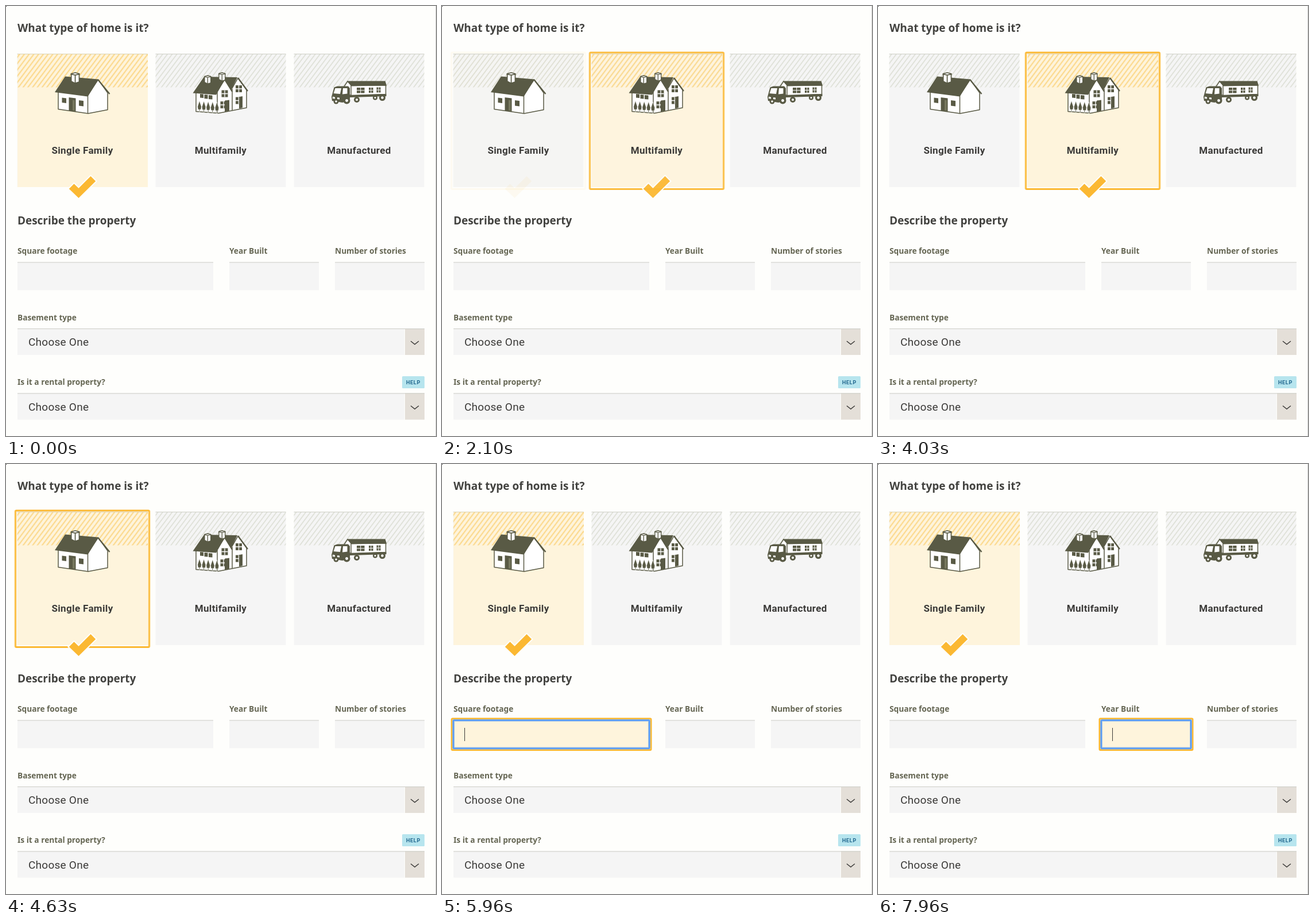
An HTML page for the animation above (8 s loop, 749x748 px).

```html
<!DOCTYPE html>
<html lang="en">
<head>
<meta charset="utf-8">
<title>Home form</title>
<style>
  html, body { margin: 0; width: 100%; height: 100%; overflow: hidden; background: #fefefc; }
  svg { display: block; width: 749px; height: 748px; }
  text { font-family: "Noto Sans", "Open Sans", sans-serif; font-weight: 600; }
  .heading { font-size: 18.95px; fill: #42423f; }
  .label { font-size: 13.7px; fill: #656653; }
  .name { font: 700 17px Roboto, sans-serif; letter-spacing: .35px; text-anchor: middle; fill: #3b3a38; }
  .value { font: 400 19px Roboto, sans-serif; letter-spacing: .25px; fill: #3b3a38; }
  .help { font: 700 9.2px Roboto, sans-serif; letter-spacing: .6px; fill: #22688f; }
  .ink { fill: #595a45; }
  .wall { fill: #fff; stroke: #595a45; stroke-width: 1.5; stroke-linejoin: round; }
  .line { fill: none; stroke: #595a45; stroke-width: 1.5; }
  .eave { fill: none; stroke: #595a45; stroke-width: 2.2; }
  .ring { fill: none; stroke: #fbb832; stroke-width: 3; }
  .fade { opacity: 0; }
</style>
</head>
<body>
<svg viewBox="0 0 749 748">
  <defs>
    <pattern id="hatchGrey" width="6.6" height="6.6" patternUnits="userSpaceOnUse" patternTransform="rotate(37)">
      <rect width="1.8" height="6.6" fill="#dfe1d8"/>
    </pattern>
    <pattern id="hatchGold" width="6.6" height="6.6" patternUnits="userSpaceOnUse" patternTransform="rotate(37)">
      <rect width="2" height="6.6" fill="#fbd685"/>
    </pattern>
    <path id="check" d="M109.800 318L118.500 309.300 126.500 317 147.500 296 156.200 304.700 126.500 334Z"
      fill="#fbb832" stroke="#fefefc" stroke-width="4" paint-order="stroke"/>
    <path id="tree" class="ink" d="M0 0L3.300 10 2.600 15H.700V20H-.700V15H-2.600L-3.300 10Z"/>
    <g id="panes">
      <rect class="ink" width="11" height="12"/>
      <path d="M5.500 0V12M0 6H11" stroke="#fff" stroke-width="1.300"/>
    </g>
    <g id="chimney">
      <path class="wall" d="M1 1.500L7 0 13 1.500V14L7 16 1 13Z"/>
      <path class="line" d="M0 2L7 3.500 14 2M7 3V16"/>
    </g>
  </defs>

  <rect width="749" height="748" fill="#fefefc"/>
  <rect x="748" width="1" height="748" fill="#d9d9d7"/>
  <rect id="corner" class="fade" width="1" height="1"/>
  <text class="heading" x="20" y="44.500">What type of home is it?</text>
  <text class="heading" x="20" y="379.500">Describe the property</text>
  <g id="cards"></g>

  <g id="house">
    <path class="wall" d="M91 149V179.500L143 187 177 180.500V151L160.500 128 142 156Z"/>
    <path class="line" d="M142.500 155V187"/>
    <path class="ink" d="M85 150L103 122.500 161 127.500 142.500 157.500Z"/>
    <path class="eave" d="M160.500 128.500L180.500 153"/>
    <use href="#chimney" transform="translate(112.500 116) scale(1.150)"/>
    <path class="ink" d="M97.500 159.500L105 160.500V169L97.500 168ZM109.500 159L121.500 160.500V184L109.500 182ZM127 164L135 165V174.500L127 173.500Z"/>
    <path d="M116 163.500L119.500 164V182L116 181.500Z" fill="#77785f"/>
  </g>

  <g id="townhouse">
    <path class="wall" d="M331 150V183.500L370 186.500 419 177V146L404 125.500 394 143 381 128 366 150Z"/>
    <path class="line" d="M368 150V186M394 144V181"/>
    <path class="ink" d="M325.500 151.500L345 123 403 124 392.500 146 381 128.500 366 154.500Z"/>
    <path class="eave" d="M381 128L394 149M404 125L421 148"/>
    <use href="#chimney" transform="translate(345 121) scale(.900)"/>
    <use href="#chimney" transform="translate(370 116) scale(.900)"/>
    <path class="ink" d="M338 153L344 153.500V160L338 159.500ZM345.500 154L351.500 154.500V161.500L345.500 161ZM353 155L359.500 155.500V162.500L353 162Z"/>
    <use href="#panes" x="375.500" y="146.500"/>
    <use href="#panes" x="400" y="138"/>
    <use href="#panes" x="373.500" y="166"/>
    <path class="ink" d="M381 164.500L389 163.500V182.500L381 184Z"/>
    <use href="#panes" x="400" y="158.500"/>
    <path class="ink" d="M406 158L412 157V177L406 178.500Z"/>
    <g id="trees"></g>
  </g>

  <g id="truck">
    <path class="wall" d="M589 140L595 131 602 139V155H589Z"/>
    <path class="wall" d="M601 138H661.500V153.500L601 155.500Z"/>
    <path class="ink" d="M594 130.500H660.500L663 138.500 602 139.500Z"/>
    <path class="ink" d="M598 155.500L662.500 153V157L598 159ZM567 158L571.500 141.500 577 139.500H596L599 143V164L586 168 568 165Z"/>
    <path d="M573.500 143H584L582 153 570.500 152ZM587 143H594.500V152.500L586 153.500ZM569 157.500L573 158.500V161.500L568.800 161ZM577 159L581 159.500V162.500L577 162Z" fill="#fff"/>
    <path class="ink" d="M611 142H624.500V151.500H611ZM632 142H639.500V151H632ZM645.500 141.500H652.500V150.500H645.500Z"/>
    <path d="M617.700 142V152M611 146.800H624.500M635.800 142V151M632 146.500H639.500M649 141V151M645.500 146H652.500" stroke="#fff" stroke-width="1"/>
    <g id="wheels"></g>
  </g>

  <g id="fields"></g>
  <g id="selects"></g>
  <rect x="690" y="644" width="39" height="21" rx="1.500" fill="#b7e5ee"/>
  <text class="help" x="697" y="658">HELP</text>
</svg>

<script>
const LOOP = 8000, FADE = 300;
const find = id => document.getElementById(id);
const fill = (id, parts) => { find(id).innerHTML = parts.join(''); };

const cards = [
  { id: 'single', x: 19.5, name: 'Single Family' },
  { id: 'multi', x: 260.5, name: 'Multifamily' },
  { id: 'made', x: 501.5, name: 'Manufactured' }
];
const cardFace = (color, hatch, edge) => `
  <rect y="83" width="227" height="232" fill="${color}"/>
  <rect y="83" width="227" height="58.5" fill="url(#${hatch})"/>
  <rect y="83" width="227" height="1" fill="${edge}"/>`;
fill('cards', cards.map(({ id, x, name }) => `
  <g transform="translate(${x} 0)">
    ${cardFace('#f5f5f5', 'hatchGrey', '#cfd0c8')}
    <g id="${id}Pick" class="fade">${cardFace('#fef4dc', 'hatchGold', '#ddd3b2')}</g>
    <text class="name" x="113.5" y="256.5">${name}</text>
    <rect id="${id}Ring" class="ring fade" x="-3" y="81" width="233" height="237.5" rx="1.5"/>
    <use id="${id}Check" class="fade" href="#check" x="-19.5"/>
  </g>`));

const fields = [
  { id: 'area', x: 20, w: 341, label: 'Square footage' },
  { id: 'year', x: 389, w: 156, label: 'Year Built' },
  { id: 'stories', x: 573, w: 156, label: 'Number of stories' }
];
fill('fields', fields.map(({ id, x, w, label }) => `
  <text class="label" x="${x}" y="431">${label}</text>
  <rect x="${x}" y="446" width="${w}" height="48.5" fill="#f5f5f5"/>
  <rect x="${x}" y="445.500" width="${w}" height="1" fill="#cbccc6"/>
  <g id="${id}Focus" class="fade">
    <rect x="${x}" y="446" width="${w}" height="48.500" fill="#fef4dc"/>
    <rect class="ring" x="${x - 3}" y="443" width="${w + 6}" height="54.500" rx="1.500"/>
  </g>
  <g id="${id}Blue" class="fade" fill="none">
    <rect x="${x}" y="446" width="${w}" height="48.500" rx="1" stroke="#a9c5e6" stroke-width="4"/>
    <rect x="${x - .2}" y="445.800" width="${w + .4}" height="49" rx="1" stroke="#5c9cf0" stroke-width="2.400"/>
  </g>
  <rect id="${id}Caret" class="fade" x="${x + 19}" y="459" width="1" height="23" fill="#3b3a38"/>`));

const selects = [
  { y: 561, label: 'Basement type' },
  { y: 673.5, label: 'Is it a rental property?' }
];
fill('selects', selects.map(({ y, label }) => `
  <text class="label" x="20" y="${y - 14.5}">${label}</text>
  <rect x="20" y="${y}" width="709" height="46" fill="#f5f5f5"/>
  <rect x="694" y="${y}" width="1" height="46" fill="#fefefc"/>
  <rect x="695" y="${y}" width="34" height="46" fill="#e4dfd8"/>
  <rect x="20" y="${y}" width="709" height="1" fill="#cbccc6"/>
  <text class="value" x="39" y="${y + 30}">Choose One</text>
  <path d="M705 ${y + 22}L712 ${y + 27.5} 719 ${y + 22}" fill="none" stroke="#3b3a38" stroke-width="1.500"/>`));

fill('trees', [0, 1, 2, 3, 4].map(i =>
  `<use href="#tree" x="${337 + i * 7.6}" y="${165 + i * .5}" stroke="#fff" stroke-width=".5"/>`));
fill('wheels', [[575, 166, 4.5], [593.5, 164.5, 6], [611, 163, 5], [643, 159.5, 4], [655.5, 159.5, 5.5]].map(([x, y, r]) =>
  `<circle class="ink" cx="${x}" cy="${y}" r="${r}"/><circle cx="${x}" cy="${y}" r="${r * .4}" fill="#fff"/>`));

// Each track is a start value followed by [time, value] changes.
function track(id, start, changes, duration = FADE) {
  let value = start;
  const frames = [{ offset: 0, opacity: start }];
  for (const [time, next] of changes) {
    frames.push({ offset: time / LOOP, opacity: value, easing: 'ease' });
    frames.push({ offset: Math.min(1, (time + duration) / LOOP), opacity: next });
    value = next;
  }
  frames.push({ offset: 1, opacity: value });
  return find(id).animate(frames, { duration: LOOP, iterations: Infinity });
}

const SINGLE = 700, MULTI = 1890, BACK = 4150, AREA = 5500, YEAR = 6900, BLINK = 500;
const blink = (from, to) => {
  const steps = [];
  for (let t = from, on = 1; t < to; t += BLINK, on = 1 - on) steps.push([t, on]);
  if (to < LOOP) steps.push([to, 0]);
  return steps;
};

const tracks = [
  track('corner', 0, [[30, 1]], 0),
  ...['Pick', 'Check'].flatMap(part => [
    track('single' + part, 1, [[MULTI, 0], [BACK, 1]]),
    track('multi' + part, 0, [[MULTI, 1], [BACK, 0]])
  ]),
  track('singleRing', 0, [[SINGLE, 1], [MULTI, 0], [BACK, 1], [AREA, 0]]),
  track('multiRing', 0, [[MULTI, 1], [BACK, 0]]),
  track('areaFocus', 0, [[AREA, 1], [YEAR, 0]]),
  track('yearFocus', 0, [[YEAR, 1]]),
  track('areaBlue', 0, [[AREA, 1], [YEAR, 0]], 0),
  track('yearBlue', 0, [[YEAR, 1]], 0),
  track('areaCaret', 0, blink(AREA, YEAR), 0),
  track('yearCaret', 0, blink(YEAR, LOOP), 0)
];
const startTime = document.timeline.currentTime;
tracks.forEach(animation => { animation.startTime = startTime; });
</script>
</body>
</html>
```
